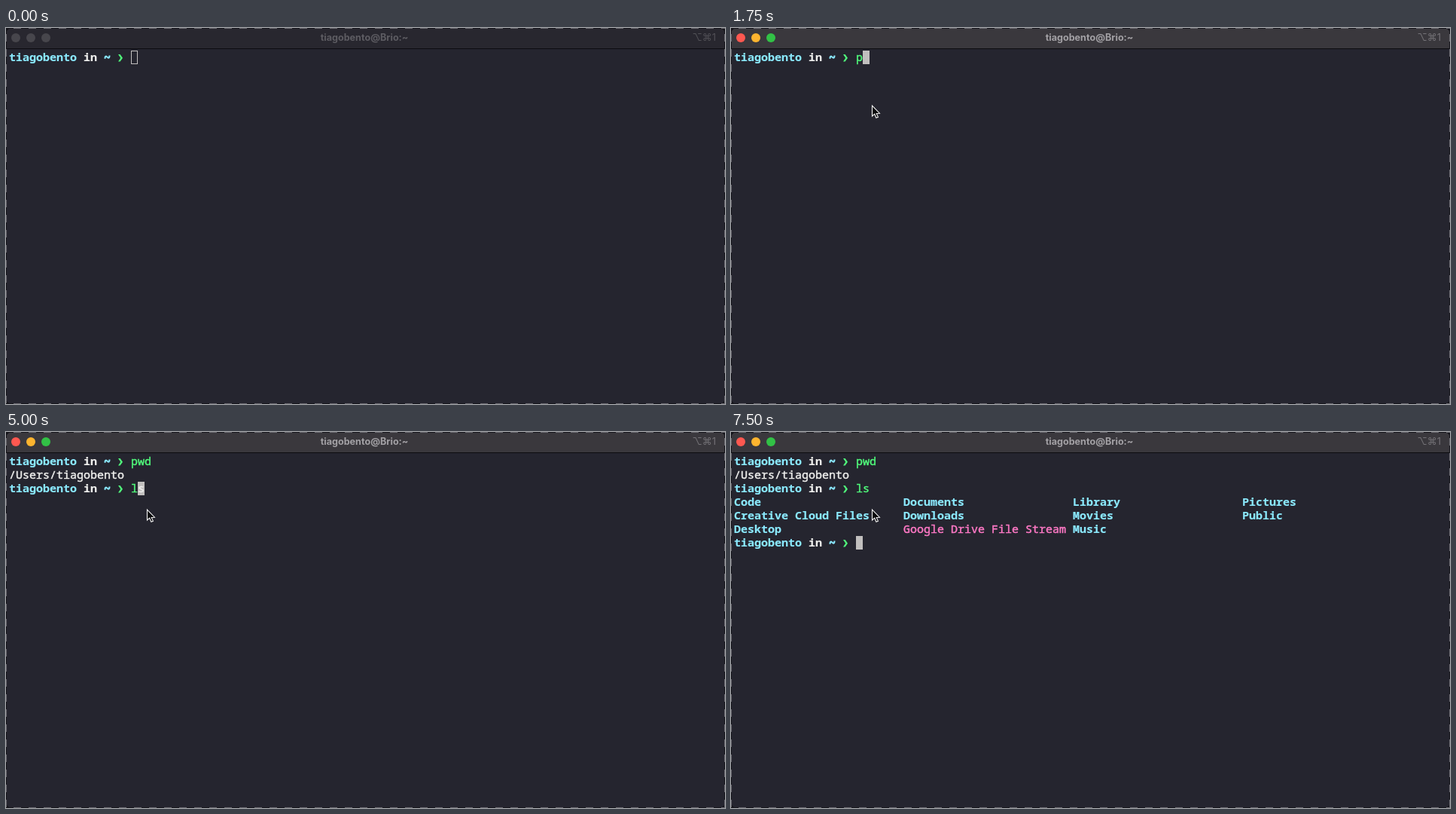
An HTML page with a canvas that plays this animation: 955x499 px, repeating every 8000 ms.

```html
<!DOCTYPE html>
<html lang="en">
<head>
<meta charset="utf-8">
<title>Terminal</title>
<style>
  html, body { margin: 0; width: 100%; height: 100%; overflow: hidden; background: #25252f; }
  canvas { display: block; width: 955px; height: 499px; }
</style>
</head>
<body>
<canvas id="stage"></canvas>
<script>
const W = 955, H = 499, LOOP = 8000;
const CELL = 9, ROW = 18, LEFT = 4, TOP = 30;
const USER = 'tiagobento', HOST = 'Brio';
const MONO = '15px "Noto Sans Mono", "DejaVu Sans Mono", monospace';
const SANS = 'Inter, "Liberation Sans", sans-serif';
const CYAN = '#8be9fd', GREEN = '#50fa7b', PINK = '#ff79c6', WHITE = '#f0f0ee', GRAY = '#c1bfbe';

// Start times of the hard changes
const POINTER = 250, MOVE = 500, FOCUS = 1000;
const PWD = 1750, PWD_DONE = 3000, LS = 5000, LS_DONE = 7250, KEY = 250;

const FILES = [
  ['Code', 'Creative Cloud Files', 'Desktop'],
  ['Documents', 'Downloads', 'Google Drive File Stream'],
  ['Library', 'Movies', 'Music'],
  ['Pictures', 'Public']
];

const canvas = document.getElementById('stage');
const ratio = window.devicePixelRatio || 1;
canvas.width = W * ratio;
canvas.height = H * ratio;
const ctx = canvas.getContext('2d');

const colX = col => LEFT + col * CELL;
const rowY = row => TOP + row * ROW;

// A hairline stroke gives the terminal text its sturdier weight
function put(text, col, row, color, bold, weight = bold ? 0.15 : 0.45) {
  ctx.font = (bold ? 'bold ' : '') + MONO;
  ctx.textAlign = 'left';
  ctx.fillStyle = ctx.strokeStyle = color;
  ctx.lineWidth = weight;
  ctx.fillText(text, colX(col), rowY(row) + 14);
  ctx.strokeText(text, colX(col), rowY(row) + 14);
}

function prompt(row, command = '') {
  put(USER, 0, row, CYAN, true);
  put('in', 11, row, WHITE, true);
  put('~', 14, row, CYAN, true, 1);
  const x = colX(16), y = rowY(row);
  ctx.fillStyle = GREEN;
  ctx.beginPath();
  [[1, 5], [3.6, 5], [7, 9.8], [3.6, 14.6], [1, 14.6], [4.2, 9.8]]
    .forEach(([dx, dy]) => ctx.lineTo(x + dx, y + dy));
  ctx.fill();
  put(command, 18, row, GREEN);
}

function caret(col, row, filled) {
  const x = colX(col), y = rowY(row);
  if (filled) {
    ctx.fillStyle = GRAY;
    ctx.fillRect(x, y, CELL, ROW);
  } else {
    ctx.strokeStyle = GRAY;
    ctx.lineWidth = 1;
    ctx.strokeRect(x + 0.5, y + 0.5, CELL - 1, ROW - 1);
  }
}

function typed(word, start, t) {
  return word.slice(0, Math.max(0, Math.floor((t - start) / KEY) + 1));
}

function titleBar(active) {
  ctx.fillStyle = active ? '#3a383d' : '#28272f';
  ctx.fillRect(0, 0, W, 27);
  ctx.fillStyle = '#0c0c10';
  ctx.fillRect(0, 27, W, 1);
  const lights = active ? ['#fe5850', '#fdb42f', '#32c146'] : Array(3).fill('#47464c');
  lights.forEach((color, i) => {
    ctx.fillStyle = color;
    ctx.beginPath();
    ctx.arc(13 + i * 20, 13, 6, 0, Math.PI * 2);
    ctx.fill();
  });
  ctx.font = 'bold 12.6px ' + SANS;
  ctx.textAlign = 'center';
  ctx.fillStyle = active ? '#a3a1a5' : '#5d5c62';
  ctx.fillText(USER + '@' + HOST + ':~', 476, 17);
  ctx.font = '13px ' + SANS;
  ctx.textAlign = 'right';
  ctx.fillStyle = active ? '#737176' : '#515056';
  ctx.fillText('⌥⌘1', 943, 17);
}

function border() {
  ctx.lineWidth = 1;
  ctx.strokeStyle = '#15151b';
  ctx.strokeRect(0.5, 0.5, W - 1, H - 1);
  ctx.strokeStyle = '#68676e';
  ctx.setLineDash([10, 10]);
  ctx.lineDashOffset = -10;
  ctx.beginPath();
  ctx.moveTo(0, 0.5);
  ctx.lineTo(W, 0.5);
  ctx.moveTo(0, H - 0.5);
  ctx.lineTo(W, H - 0.5);
  ctx.moveTo(0.5, -2);
  ctx.lineTo(0.5, H);
  ctx.moveTo(W - 0.5, -2);
  ctx.lineTo(W - 0.5, H);
  ctx.stroke();
  ctx.setLineDash([]);
}

function corners() {
  ctx.fillStyle = '#101016';
  ctx.beginPath();
  ctx.rect(0, 0, W, H);
  ctx.roundRect(0, 0, W, H, 8);
  ctx.fill('evenodd');
}

function pointer(x, y) {
  ctx.beginPath();
  [[0.5, 1], [0.5, 15], [3.7, 12.2], [5.9, 17.2], [8.4, 16.1], [6.2, 11.4], [10.4, 11.2]]
    .forEach(([dx, dy]) => ctx.lineTo(x + dx, y + dy));
  ctx.closePath();
  ctx.fillStyle = '#08080a';
  ctx.fill();
  ctx.strokeStyle = '#f4f4f4';
  ctx.lineWidth = 1.1;
  ctx.stroke();
}

function listing(row) {
  FILES.forEach((names, i) => names.forEach((name, j) => {
    const link = name.startsWith('Google');
    put(name, i * 25, row + j, link ? PINK : CYAN, !link);
  }));
}

function shell(t) {
  const first = typed('pwd', PWD, t);
  prompt(0, first);
  if (t < PWD_DONE) {
    caret(18 + first.length, 0, t >= FOCUS);
    return;
  }
  put('/Users/' + USER, 0, 1, WHITE);
  const second = typed('ls', LS, t);
  prompt(2, second);
  if (t < LS_DONE) {
    caret(18 + second.length, 2, true);
    if (second === 'l') put('s', 19, 2, WHITE);
    return;
  }
  listing(3);
  prompt(6);
  caret(18, 6, true);
}

function draw(t) {
  ctx.setTransform(ratio, 0, 0, ratio, 0, 0);
  ctx.fillStyle = '#25252f';
  ctx.fillRect(0, 0, W, H);
  titleBar(t >= FOCUS);
  corners();
  border();
  shell(t);
  if (t >= MOVE) pointer(187, 102);
  else if (t >= POINTER) pointer(228, 74);
}

const begin = performance.now();
function tick() {
  draw((performance.now() - begin) % LOOP);
  requestAnimationFrame(tick);
}
tick();
</script>
</body>
</html>
```
